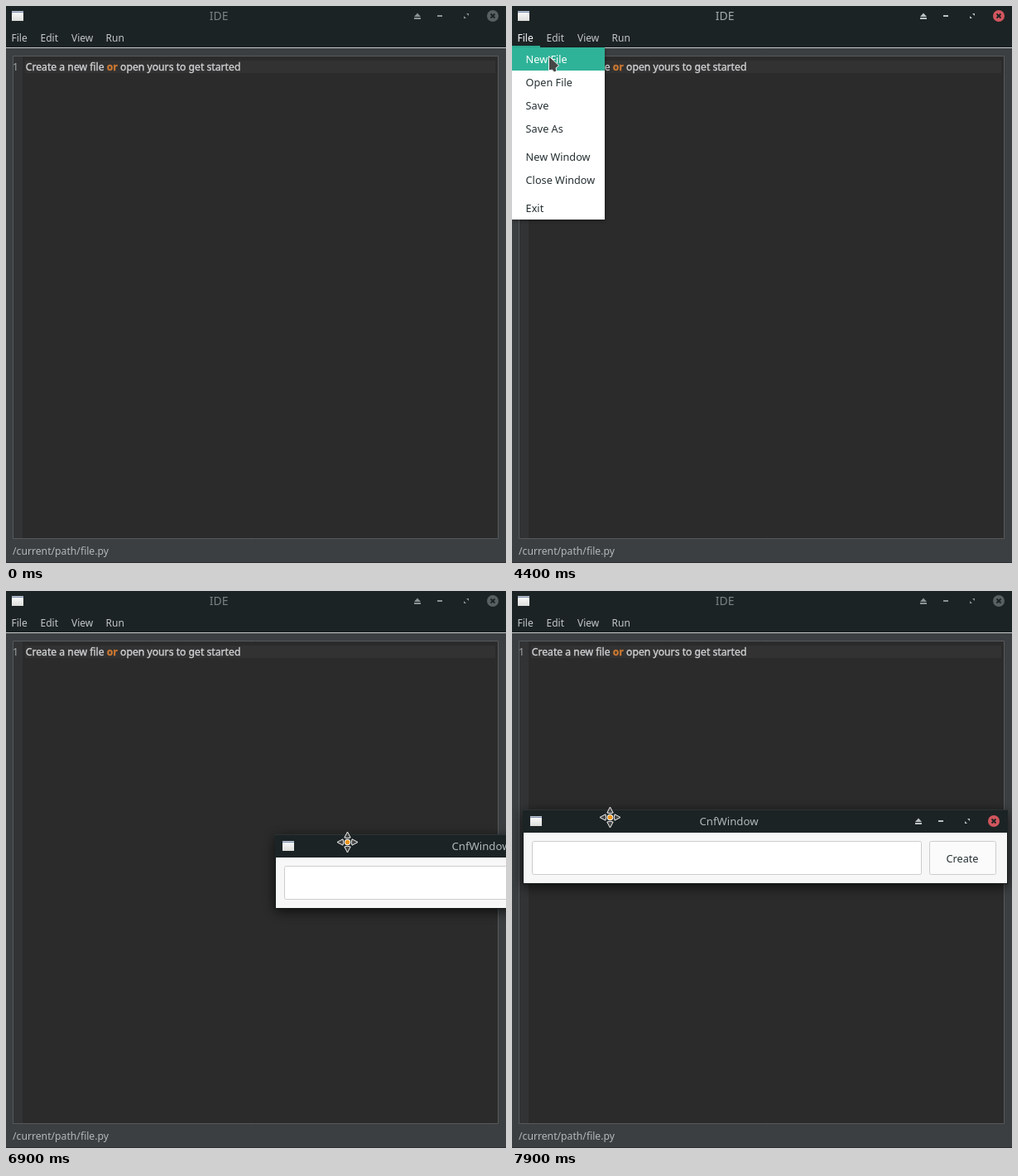
Recreate the animation shown at these times as an HTML page with a canvas. Size 604 px wide and 673 px high, loop 8 s.

```html
<!DOCTYPE html>
<html lang="en">
<head>
<meta charset="utf-8">
<title>IDE</title>
<style>
  html, body { margin: 0; width: 100%; height: 100%; overflow: hidden; background: #3c3f41; }
  canvas { display: block; }
</style>
</head>
<body>
<canvas id="stage" width="604" height="673"></canvas>
<script>
const ctx = document.getElementById('stage').getContext('2d');
const LOOP = 8000, STEP = 100;
const DARK = '#1c2325', TEAL = '#2fb398', INK = '#263033';
const MENU_GROUPS = [
  ['New File', 'Open File', 'Save', 'Save As'],
  ['New Window', 'Close Window'],
  ['Exit']
];

const ENTRY = { x: 590, y: 368 };
const MOVES = [
  { from: 800, to: 1400, x: 130, y: 118 },   // enter the window
  { from: 1600, to: 2400, x: 8, y: 35 },     // reach the File menu
  { from: 3500, to: 3900, x: 31, y: 55 },    // hover New File
  { from: 4000, to: 4400, x: 44, y: 60 },
  { from: 5300, to: 5600, x: 411, y: 242 },  // go to the dialog's title bar
  { from: 5700, to: 6400, x: 519, y: 307 }
];

const progress = (t, from, to) => Math.min(1, Math.max(0, (t - from) / (to - from)));
const easeOut = p => 1 - (1 - p) ** 2;
const smooth = p => p * p * (3 - 2 * p);

function pointerAt(t) {
  let { x, y } = ENTRY;
  for (const move of MOVES) {
    const p = easeOut(progress(t, move.from, move.to));
    x += (move.x - x) * p;
    y += (move.y - y) * p;
  }
  return [Math.round(x), Math.round(y)];
}

// A fast sweep to the left that lifts towards its end
function dragAt(t) {
  const p = smooth(progress(t, 6700, 7290));
  return [Math.round(519 - 401 * p), Math.round(303 - 30 * p ** 6.8)];
}

// The dialog trails the hand that holds it
function dialogAt(t) {
  const [x, y] = dragAt(t - 20);
  return [x - 104, y - 8];
}

function rect(x, y, w, h, fill) {
  ctx.fillStyle = fill;
  ctx.fillRect(x, y, w, h);
}

function text(str, x, y, size, fill, weight = 400) {
  ctx.font = `${weight} ${size}px "Noto Sans", "Open Sans", sans-serif`;
  ctx.fillStyle = fill;
  ctx.fillText(str, x, y);
}

function poly(points, fill, stroke) {
  ctx.beginPath();
  points.forEach(([x, y]) => ctx.lineTo(x, y));
  ctx.closePath();
  ctx.fillStyle = fill;
  ctx.fill();
  if (stroke) {
    ctx.strokeStyle = stroke;
    ctx.stroke();
  }
}

function disc(x, y, r, fill) {
  ctx.beginPath();
  ctx.arc(x, y, r, 0, 7);
  ctx.fillStyle = fill;
  ctx.fill();
}

function box(x, y, w, h, fill, stroke, r = 2) {
  ctx.beginPath();
  ctx.roundRect(x + .5, y + .5, w - 1, h - 1, r);
  ctx.fillStyle = fill;
  ctx.fill();
  ctx.strokeStyle = stroke;
  ctx.stroke();
}

function shadowed(color, blur, dy, paint) {
  ctx.save();
  ctx.shadowColor = color;
  ctx.shadowBlur = blur;
  ctx.shadowOffsetY = dy;
  paint();
  ctx.restore();
}

function windowIcon(x, y) {
  const paper = ctx.createLinearGradient(0, y, 0, y + 12);
  paper.addColorStop(0, '#ffffff');
  paper.addColorStop(1, '#dcdddb');
  rect(x, y, 14, 12, paper);
  rect(x, y, 14, 1, '#c4cad6');
  rect(x, y + 1, 14, 1, '#7c90b0');
}

// (x, y) is the centre of the close button
function windowButtons(x, y, focused) {
  const ink = focused ? '#bcc2c2' : '#8c9293';
  poly([[x - 95, y + 1], [x - 91, y - 3.5], [x - 87, y + 1]], ink);
  rect(x - 95, y + 2, 8, 2, ink);
  rect(x - 67, y - 1, 6, 2, ink);
  poly([[x - 32, y - 3], [x - 29, y - 3], [x - 29, y]], ink);
  poly([[x - 35, y], [x - 32, y + 3], [x - 35, y + 3]], ink);
  disc(x, y, 7, focused ? '#d2565e' : '#596062');
  ctx.beginPath();
  for (const s of [-1, 1]) {
    ctx.moveTo(x - 2.5, y - 2.5 * s);
    ctx.lineTo(x + 2.5, y + 2.5 * s);
  }
  ctx.strokeStyle = DARK;
  ctx.lineWidth = 1.8;
  ctx.stroke();
  ctx.lineWidth = 1;
}

// Editor text, slightly heavier than regular; returns the end of the run
function code(str, x, y, fill, weight) {
  text(str, x, y, 12.2, fill, weight);
  ctx.lineWidth = .35;
  ctx.strokeStyle = fill;
  ctx.strokeText(str, x, y);
  ctx.lineWidth = 1;
  return x + ctx.measureText(str).width;
}

function mainWindow(focused, fileActive) {
  rect(0, 0, 604, 673, '#3c3f41');
  rect(0, 0, 604, 50, DARK);
  rect(0, 50, 604, 1, '#c9cbcb');
  windowIcon(7, 6);
  text('IDE', 245.8, 17, 14, focused ? '#a3abac' : '#7a8284');
  windowButtons(588, 12, focused);

  text('File', 6.5, 43, 12, fileActive ? '#ffffff' : '#c3c7c8');
  text('Edit', 41.5, 43, 12, '#c3c7c8');
  text('View', 79, 43, 12, '#c3c7c8');
  text('Run', 120.5, 43, 12, '#c3c7c8');
  if (fileActive) rect(0, 48, 34, 2, TEAL);

  box(8, 60, 587, 584, '#2b2b2b', '#56595b', 0);
  rect(9, 61, 11, 582, '#313335');
  rect(23, 66, 568, 15, '#323232');
  text('1', 8, 78, 12.2, '#a4a6a8');
  let x = code('Create a new file ', 23.7, 78, '#d0d2d3');
  x = code('or', x, 78, '#cc7832', 700);
  code(' open yours to get started', x, 78, '#d0d2d3');

  text('/current/path/file.py', 8, 663, 12.2, '#b4b7b9');
  rect(0, 672, 604, 1, '#2b2e30');
}

function fileMenu(hoverFirst) {
  shadowed('rgba(0,0,0,.45)', 5, 1, () => rect(0, 51, 112, 207, '#fff'));
  rect(0, 50, 112, 208, '#fff');
  if (hoverFirst) rect(0, 50, 112, 28, TEAL);
  let y = 69;
  for (const group of MENU_GROUPS) {
    for (const label of group) {
      text(label, 16.6, y, 12.7, hoverFirst && y === 69 ? '#fff' : INK);
      y += 28;
    }
    y += 6;
  }
}

function dialog(x, y, entryFocused, caret) {
  shadowed('rgba(0,0,0,.7)', 14, 3, () => rect(x - 1, y, 586, 89, '#14191a'));
  rect(x - 1, y, 586, 27, DARK);
  rect(x - 1, y - 1, 586, 1, '#2c3335');
  rect(x, y + 27, 584, 61, '#f7f7f7');
  windowIcon(x + 8, y + 7);
  text('CnfWindow', x + 212.5, y + 18, 13.2, '#b1b9ba');
  windowButtons(x + 568, y + 13, true);
  box(x + 10, y + 37, 471, 41, '#fff', entryFocused ? TEAL : '#cdcdcd');
  box(x + 490, y + 37, 81, 41, '#fbfbfb', '#cdcdcd');
  text('Create', x + 510.5, y + 63, 12.7, INK);
  if (caret) rect(x + 18, y + 48, 1, 20, '#111');
}

function arrow(x, y) {
  ctx.save();
  ctx.translate(x + .5, y + .5);
  poly([[0, 0], [0, 17.5], [4, 16.5], [6.5, 19.5], [9.5, 18], [8.5, 14.5], [12.2, 11.5]],
    '#464646', '#f4f4f4');
  ctx.restore();
}

function moveCursor(x, y) {
  ctx.save();
  ctx.translate(x + .5, y + .5);
  for (let i = 0; i < 4; i++) {
    poly([[0, -12.5], [3.7, -5.5], [0, -4.8], [-3.7, -5.5]], '#464646', '#f4f4f4');
    ctx.rotate(Math.PI / 2);
  }
  disc(0, 0, 3.8, '#fff');
  disc(0, 0, 2.8, '#f0941e');
  ctx.restore();
}

function draw(time) {
  const t = Math.floor(time % LOOP / STEP) * STEP;
  const menuOpen = t >= 2800 && t < 4900;
  const dialogOpen = t >= 5000;
  const dragging = t >= 6800;
  const [px, py] = pointerAt(t);

  mainWindow(t >= 2800 && !dialogOpen, t >= 2300 && t < 4900);
  if (menuOpen) fileMenu(py > 49);
  if (dialogOpen) {
    const caret = !dragging && (t - 5000) % 900 < 500;
    ctx.globalAlpha = t < 5100 ? .6 : 1;
    dialog(...dialogAt(t), !dragging, caret);
    ctx.globalAlpha = 1;
  }
  if (dragging) moveCursor(...dragAt(t));
  else if (t >= ENTRY_TIME) arrow(px, py);
}

const ENTRY_TIME = MOVES[0].from;
const start = performance.now();
function tick() {
  draw(performance.now() - start);
  requestAnimationFrame(tick);
}
tick();
</script>
</body>
</html>
```
